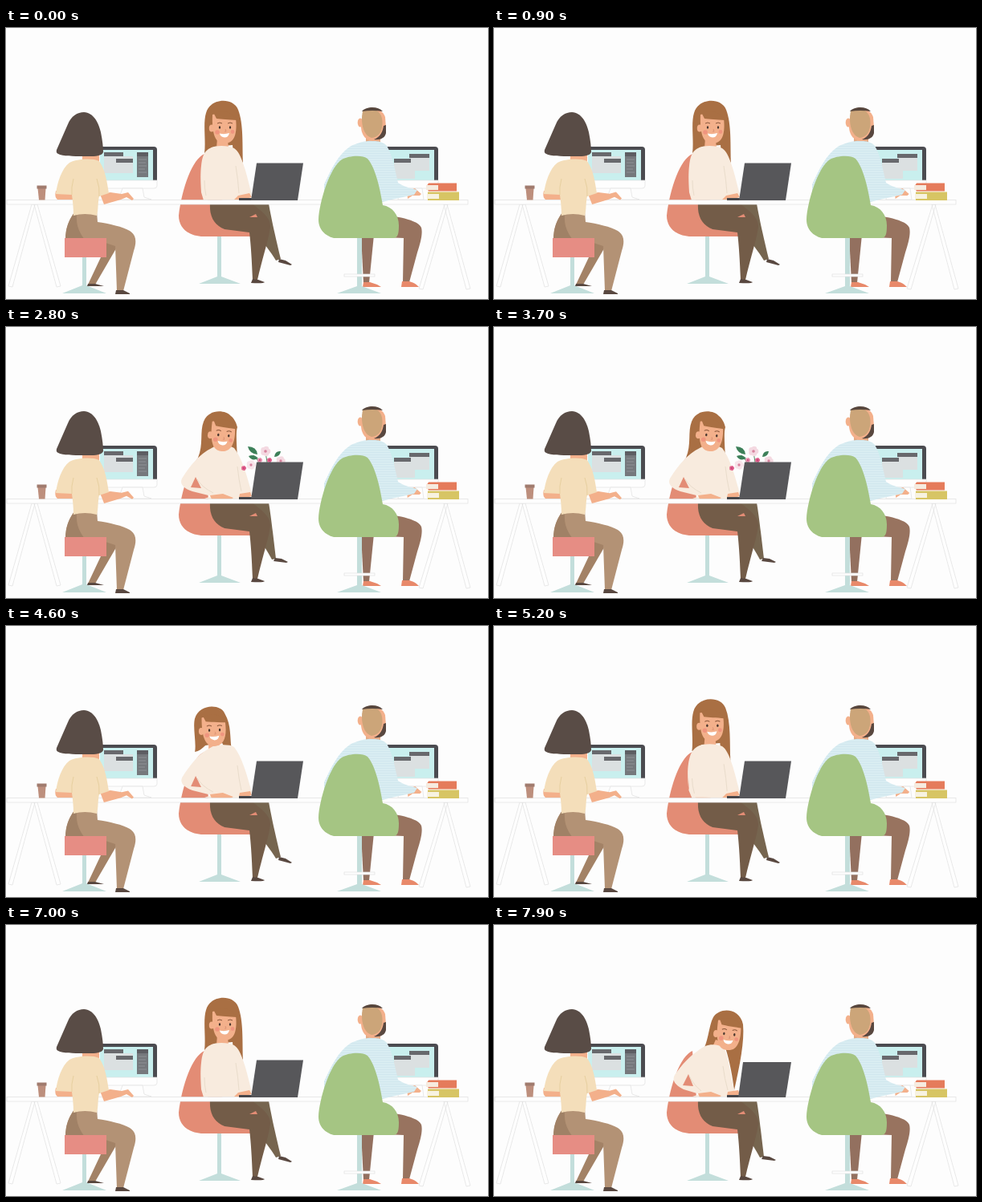
An HTML page for the animation above (8 s loop, 600 by 338 pixels).

```html
<!DOCTYPE html>
<html lang="en">
<head>
<meta charset="utf-8">
<title>Office desk</title>
<style>
html, body { margin: 0; width: 100%; height: 100%; overflow: hidden; background: #fdfdfd; }
svg { display: block; width: 100vw; height: 100vh; }
.skin { fill: #f3b08b; }
.hair { fill: #a96f43; }
.seat { fill: #e38c75; }
.steel { fill: #c3dedb; }
.white { fill: #fefefe; stroke: #e0e0e0; stroke-width: .7; }
.shoe { fill: #594840; }
</style>
</head>
<body>
<svg viewBox="0 0 600 338">
  <defs>
    <pattern id="stripes" width="4" height="3" patternUnits="userSpaceOnUse">
      <rect width="4" height="3" fill="#d9edf2"/>
      <rect width="4" height=".6" fill="#cce4ec"/>
    </pattern>
    <g id="screen">
      <path d="M0 0H67Q71 0 71 4V43H0Z" fill="#4b4b50"/>
      <path d="M0 4H66V43H0Z" fill="#c9efee"/>
    </g>
  </defs>
  <rect width="600" height="338" fill="#fdfdfd"/>

  <g class="white">
    <path d="M32 220H36L8 323L3 322ZM35 220H39L68 322L63 323Z"/>
    <path d="M546 220H550L519 326L514 325ZM545 220H549L578 325L573 326Z"/>
  </g>

  <!-- middle chair -->
  <path class="steel" d="M263 258H268V310L292 319H240L263 310Z"/>
  <path class="seat" d="M247 157C232 163 219 200 215 234C215 250 228 260 246 260H306Q312 258 309 254L270 250L252 215Z"/>

  <!-- middle woman -->
  <path id="backLeg" fill="#76654f"/>
  <path id="backShoe" class="shoe"/>
  <path d="M254 219H306C318 228 329 236 329 247C328 260 320 284 313 314H307C306 290 305 272 303 255L272 251C260 246 253 236 254 219Z" fill="#735c48"/>
  <path class="seat" d="M303 236L311 232L313 236Z"/>
  <path class="shoe" d="M307 313L314 314L322 317Q321 319 305 318Z"/>
  <path id="hair" class="hair"/>
  <path id="neck" class="skin"/>
  <path id="torso" fill="#f8ebde"/>
  <path id="gap" class="seat"/>
  <path id="fold" fill="none" stroke="#e9dccb" stroke-width="1"/>
  <path id="hand" class="skin"/>
  <g id="face">
    <ellipse class="skin" cx="-15" cy="-2" rx="3.2" ry="4.5"/>
    <path class="skin" d="M-14 -19C-7 -21 6 -18 15 -14C17 3 14 17 1 17C-10 17 -15 7 -14 -19Z"/>
    <path class="hair" d="M-12 -20C-4 -25 10 -24 17 -12C6 -13 -3 -13 -9 -14Z"/>
    <g fill="#f0957f"><circle cx="-8" cy="3" r="2.8"/><circle cx="11" cy="2.5" r="2.4"/></g>
    <g fill="#49372f"><ellipse cx="-5" cy="-3" rx="1.2" ry="1.8"/><ellipse cx="8" cy="-3" rx="1.2" ry="1.8"/></g>
    <path d="M-8 -8Q-5 -10 -2 -8M5 -8Q8 -10 11 -8" fill="none" stroke="#8b583c" stroke-width="1"/>
    <path d="M2 -1L3 2L1 2" fill="none" stroke="#d78e72" stroke-width=".8"/>
    <path d="M-5 4.5Q1 6 7 4Q6 9.5 1 9.5Q-4 9 -5 4.5Z" fill="#fff"/>
  </g>

  <!-- desk and what stands on it -->
  <use href="#screen" x="117" y="148"/>
  <path d="M122 160H158V181H122Z" fill="#dbe0e1"/>
  <path d="M122 155H146V160H122ZM137 163H158V168H137Z" fill="#68696d"/>
  <path d="M163 155H177V186H163Z" fill="#75787c"/>
  <path d="M163 155H177V160H163Z" fill="#5d5e63"/>
  <path d="M165 164H175M165 168H174M165 172H175M165 176H173M165 180H175" stroke="#96999c" stroke-width=".8"/>
  <path class="white" d="M117 190H188V197Q188 200 184 200H117Z"/>
  <path class="white" d="M145 200H170L172 211L181 214H140Z"/>
  <use href="#screen" x="467" y="148"/>
  <path d="M483 168H509V188H483ZM503 162H527V178H503Z" fill="#dbe0e1"/>
  <path d="M502 157H527V162H502ZM483 163H504V168H483Z" fill="#68696d"/>
  <path class="white" d="M467 190H538V197Q538 200 534 200H467Z"/>
  <path class="white" d="M490 200H518L520 214H488Z"/>
  <rect class="white" x="1" y="214.5" width="574" height="5.5"/>
  <path d="M39.500 200H49.500L48.500 214.500H41Z" fill="#bd8f7d"/>
  <path d="M38.500 196.500H50.500V200.500H38.500Z" fill="#a07b6e"/>
  <path d="M526 193.500H561V203.500H526Q522 198 526 193.500Z" fill="#e57b5b"/>
  <path d="M523 196H538V202H523Z" fill="#f6ebdf"/>
  <path d="M525 204.500H564V215H525Z" fill="#d7c564"/>
  <path d="M524 207H539V213H524Z" fill="#f7f2e0"/>

  <g id="flowers">
    <path d="M308 160Q320 172 329 200M323 156L330 200M341 166Q333 180 331 200" fill="none" stroke="#568b65" stroke-width="1"/>
    <path d="M301 149Q312 149 313 159Q303 158 301 149ZM302 161Q309 158 314 164Q306 168 302 161ZM334 162Q335 154 342 155Q341 162 334 162Z" fill="#3d8059"/>
    <g id="blooms"></g>
  </g>
  <path d="M290 212H308V215H290Z" fill="#47474b"/>
  <path id="lid" fill="#57575a"/>

  <!-- left woman -->
  <path class="steel" d="M95 285H100V321L125 331H70L95 321Z"/>
  <path d="M124 262L140 270L111 320H102L118 286Z" fill="#a38266"/>
  <path class="shoe" d="M102 319L111 319L122 322H101Z"/>
  <path d="M86 229H113L114 242C128 244 146 248 154 253C162 258 163 266 159 278L146 328H138L136 272L112 264H74C74 249 79 237 86 229Z" fill="#b39275"/>
  <path d="M86 229C78 240 74 250 74 264H98C91 255 87 246 88 233Z" fill="#a08166"/>
  <path class="shoe" d="M137 327L146 327L154 331V332H136Z"/>
  <path d="M73 262H125V286H73Z" fill="#e68d84"/>
  <path class="skin" d="M62 203H84V214H64Q60 211 62 203ZM95 158H116V170H95Z"/>
  <path id="typing" class="skin" d="M117 207L130 205L144 207L152 205L159 213L157 215L150 211L143 214L122 220Z"/>
  <path d="M79 168C88 163 108 162 116 166C124 177 126 194 128 206L116 210C114 219 115 228 113 234Q98 230 84 234C84 224 83 216 82 208L62 207C64 192 69 176 79 168Z" fill="#f4deba"/>
  <path d="M84 188Q81 199 82 208M113 188Q117 199 116 210" fill="none" stroke="#e7cf9f" stroke-width="1"/>
  <path d="M63 152L77 120C81 110 89 105 97 105C109 106 115 117 118 130C120 140 121 148 121 155C119 161 105 160 95 160C85 160 70 160 65 157Q62 156 63 152Z" fill="#594c46"/>

  <!-- man -->
  <path d="M442 258H458L452 318H445Z" fill="#93705f"/>
  <path d="M478 234C497 237 513 241 517 249C519 256 516 268 512 280L502 317H494L495 262L470 261Z" fill="#98735f"/>
  <path d="M445 317H453Q461 319 467 323H444ZM493 316H502Q510 318 514 323H492Z" fill="#e8896a"/>
  <path id="mouseHand" class="skin" d="M499 203L509 200L517 207L515 209L506 209L500 213Z"/>
  <path d="M448 130H466V148H448Z" fill="#e3ab87"/>
  <path d="M428 148C444 139 467 138 474 147C481 158 484 176 488 193C495 198 504 200 512 202L508 208L480 214L465 218H396V195C404 178 413 158 428 148Z" fill="url(#stripes)"/>
  <ellipse class="skin" cx="441" cy="118" rx="3.3" ry="5.5"/>
  <path class="skin" d="M445 103C456 97 469 101 472 111L473 124C472 136 466 141 457 141C445 140 441 130 442 117Z"/>
  <path d="M473 121V131C472 137 466 140 458 139C466 136 469 129 470 122Z" fill="#594840"/>
  <path d="M444 104C455 98 466 102 468 113C470 125 466 136 455 137C445 134 441 119 444 104Z" fill="#cca579"/>
  <path d="M443 104C448 98 463 97 469 104Q456 102 443 104Z" fill="#57463d"/>
  <path class="steel" d="M437 260H443V322L467 331H412L437 322Z"/>
  <rect class="white" x="421" y="307" width="38" height="3"/>
  <path d="M418 164C427 159 444 158 450 163C459 173 465 196 469 221C481 223 489 233 489 246C489 256 488 262 482 262H408C396 259 389 250 389 239C390 217 403 174 418 164Z" fill="#a5c583"/>
</svg>
<script>
const $ = id => document.getElementById(id);

// Poses share path structure so their numbers can be blended.
const reach = {
  torso: 'M256 151C262 148 278 147 284 151C293 162 300 185 306 208L290 214L247 214L256 211L232 205C220 201 216 195 219 189C229 173 241 158 256 151Z',
  gap: 'M236 187L243 201L230 200Z',
  fold: 'M238 190Q244 200 258 207M288 174Q290 192 293 205',
  hand: 'M254 210L270 208L283 213L280 215L256 215ZM291 208L304 206L306 211L296 214L290 213Z',
  lid: 'M312 168.5L370 168.5L363 215L305 215Z'
};
const legBack = {
  backLeg: 'M306 219L327 219C330 236 336 264 342 288L336 290C330 280 320 266 308 254Z',
  backShoe: 'M340 288L348 290L356 295L354 296L339 292Z'
};
const legNear = {
  backLeg: 'M306 219L327 219C330 236 333 264 336 289L331 290C326 280 318 268 308 254Z',
  backShoe: 'M335 288L343 289L351 293L349 294L333 292Z'
};

const upright = {
  ...legBack,
  hair: 'M247 156C249 140 245 119 249 106C254 87 283 86 289 102C296 120 294 148 295 168C287 163 282 154 282 146L259 148C255 152 251 155 247 156Z',
  neck: 'M263 137L276 140L277 150L262 150Z',
  torso: 'M252 151C258 146 276 146 284 150C294 156 300 185 306 208L290 215L249 215L246 215L243 205C242 190 242 180 243 172C244 162 246 155 252 151Z',
  gap: 'M243 190L243 205L243 203Z',
  fold: 'M247 190Q247 200 249 209M286 172Q289 190 290 206',
  hand: 'M250 214L260 214L270 214L268 215L252 215ZM289 209L303 206L306 211L295 214L284 214Z',
  lid: reach.lid,
  face: '271 127 0'
};
const leanRight = {
  ...reach, ...legNear,
  hair: 'M258 160C267 148 267 126 273 115C281 102 306 103 310 124C312 145 306 175 299 206C297 190 294 172 288 153L278 152C271 155 264 159 258 160Z',
  neck: 'M276 143L290 149L285 156L271 154Z',
  torso: 'M263 151C270 148 280 149 286 153C293 165 295 195 301 212L290 214L247 214L256 211L236 205C226 200 221 194 225 187C235 172 248 159 263 151Z',
  gap: 'M242 186L248 201L235 200Z',
  fold: 'M243 188Q248 199 258 207M285 176Q287 192 291 206',
  lid: 'M310 171L370 171L363 215L304 215Z',
  face: '291 139 6'
};
const seeFlowers = {
  ...reach, ...legNear,
  hair: 'M239 163C246 147 241 130 246 118C252 102 273 103 280 111C285 115 287 121 288 125C286 130 287 145 288 163C284 160 281 156 279 151L260 150C254 156 247 161 239 163Z',
  neck: 'M259 143L272 148L272 154L258 153Z',
  face: '269 138 5'
};
const lookFront = {
  ...reach, ...legBack,
  hair: 'M235 157C237 145 232 126 235 115C241 97 267 97 272 109C281 124 278 140 281 156C275 155 271 151 269 146L248 149C244 153 240 156 235 157Z',
  neck: 'M252 140L265 143L266 153L252 153Z',
  face: '258 133 -2'
};

const steps = [
  [0, upright], [1050, upright], [1850, leanRight], [2150, leanRight],
  [2700, seeFlowers], [3700, seeFlowers], [4300, lookFront], [4550, lookFront],
  [5300, upright], [7150, upright], [7850, leanRight], [8000, leanRight]
];
// Drop of the bouquet below its full height.
const bouquet = [[0, 60], [2150, 60], [2700, 0], [3700, 0], [4200, 60], [8000, 60]];

const blooms = [
  [323, 155, 6, '#f4d9e1', '#d8849f'], [316, 166, 3, '#e98fae', '#bd3b6b'],
  [328, 166, 3, '#e15f8d', '#bd3b6b'], [342, 167, 5.5, '#f4d9e1', '#d8849f'],
  [305, 172, 5.5, '#f7e4ea', '#d8849f'], [296, 176, 3, '#e15f8d', '#bd3b6b']
];
$('blooms').innerHTML = blooms.map(([x, y, r, petal, core]) =>
  [0, 1, 2, 3, 4].map(i => {
    const a = i * Math.PI * 0.4;
    return `<circle cx="${x + Math.cos(a) * r * .5}" cy="${y + Math.sin(a) * r * .5}" r="${r * .55}" fill="${petal}"/>`;
  }).join('') + `<circle cx="${x}" cy="${y}" r="${r * .3}" fill="${core}"/>`).join('');

const ease = p => p * p * (3 - 2 * p);

function at(list, t) {
  let i = 0;
  while (i < list.length - 2 && t >= list[i + 1][0]) i++;
  const [t0, from] = list[i], [t1, to] = list[i + 1];
  return { from, to, p: ease((t - t0) / (t1 - t0)) };
}

function blend(a, b, p) {
  const ends = b.match(/-?[\d.]+/g);
  let i = 0;
  return a.replace(/-?[\d.]+/g, n => (+n + (ends[i++] - n) * p).toFixed(2));
}

const parts = ['hair', 'neck', 'torso', 'gap', 'fold', 'hand', 'backLeg', 'backShoe', 'lid'];

function draw(t) {
  const { from, to, p } = at(steps, t);
  for (const id of parts) $(id).setAttribute('d', blend(from[id], to[id], p));
  const [x, y, r] = blend(from.face, to.face, p).split(' ');
  $('face').setAttribute('transform', `translate(${x} ${y}) rotate(${r})`);

  const f = at(bouquet, t);
  const drop = f.from + (f.to - f.from) * f.p;
  $('flowers').setAttribute('transform', `translate(0 ${drop})`);
  $('flowers').setAttribute('visibility', drop > 40 ? 'hidden' : 'visible');

  const tap = Math.sin(t / 8000 * Math.PI * 32);
  $('typing').setAttribute('transform', `rotate(${tap * .8} 122 210)`);
  $('mouseHand').setAttribute('transform', `translate(${tap * .4} 0)`);
}

function frame() {
  draw(Math.floor(performance.now() % 8000 / 100) * 100);
  requestAnimationFrame(frame);
}
frame();
</script>
</body>
</html>
```
